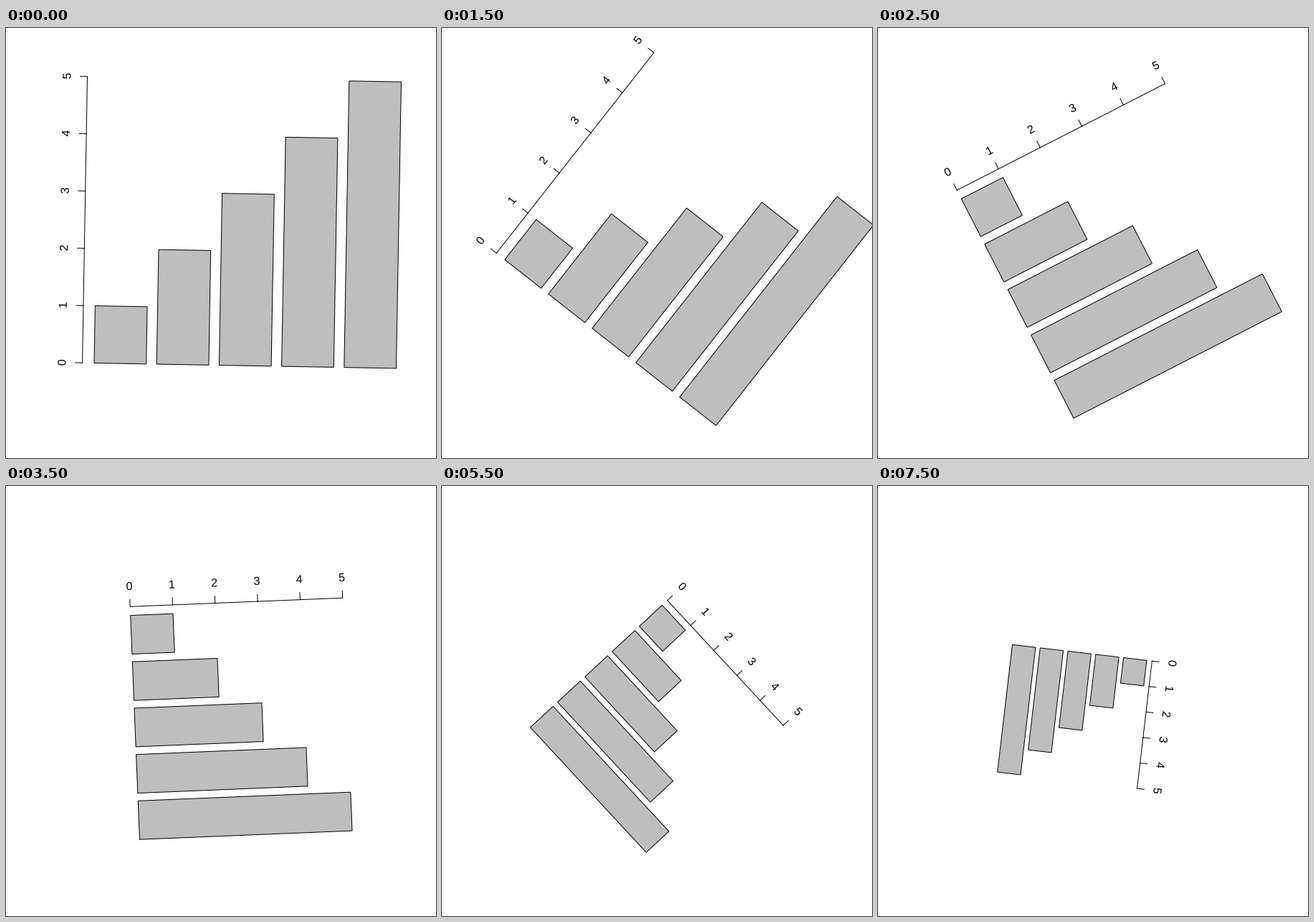
Recreate the animation shown at these times as a matplotlib script. Size 600 by 600 pixels, loop 8 s.

```python
import matplotlib.pyplot as plt
from matplotlib.animation import FuncAnimation
from matplotlib.patches import PathPatch, Rectangle
from matplotlib.path import Path
from matplotlib.textpath import TextPath
from matplotlib.transforms import Affine2D

SIZE, DPI = 600, 100
FRAMES, STEP_MS = 16, 500
VALUES = range(1, 6)
TICK, LABEL_GAP, FONT_PX = 10, 23.2, 16
DIGIT_HALF = 0.278 * FONT_PX
LINE = 72 / DPI

fig = plt.figure(figsize=(SIZE / DPI, SIZE / DPI), dpi=DPI, facecolor="white")
ax = fig.add_axes([0, 0, 1, 1])


def axis_path(x, y0, y1):
    verts, codes = [(x, y0), (x, y1)], [Path.MOVETO, Path.LINETO]
    for i in range(6):
        y = y0 + (y1 - y0) * i / 5
        verts += [(x, y), (x - TICK, y)]
        codes += [Path.MOVETO, Path.LINETO]
    return Path(verts, codes)


def digit_path(text, x, y):
    glyph = TextPath((-DIGIT_HALF, 0), text, size=FONT_PX,
                     prop={"family": "Liberation Sans"})
    return glyph.transformed(Affine2D().rotate_deg(90).translate(x, y))


def draw(k):
    ax.clear()
    ax.set(xlim=(0, SIZE), ylim=(0, SIZE))
    ax.axis("off")

    # The plot turns clockwise about the stage centre while it shrinks.
    turn = 1 + 359 / 29 * k
    place = (Affine2D().rotate_deg(-turn).translate(SIZE / 2, SIZE / 2)
             + ax.transData)

    axis_x = -190.5 + 7.68 * k
    left, right = -174.05 + 7.083 * k, 247.5 - 8.44 * k
    base, top = -170.6 + 7.04 * k, 229.2 - 7.68 * k
    bar, unit = (right - left) / 5.8, (top - base) / 5

    for v in VALUES:
        ax.add_patch(Rectangle((left + 1.2 * bar * (v - 1), base), bar,
                               unit * v, fc="#bebebe", ec="black",
                               lw=LINE, transform=place))

    ax.add_patch(PathPatch(axis_path(axis_x, base, top), fc="none",
                           ec="black", lw=LINE, capstyle="round",
                           transform=place))
    for i in range(6):
        path = digit_path(str(i), axis_x - LABEL_GAP, base + unit * i)
        ax.add_patch(PathPatch(path, fc="black", lw=0, transform=place))
    return ax.patches


anim = FuncAnimation(fig, draw, frames=FRAMES, interval=STEP_MS,
                     init_func=lambda: [], repeat=True, repeat_delay=0)
plt.show()
```
